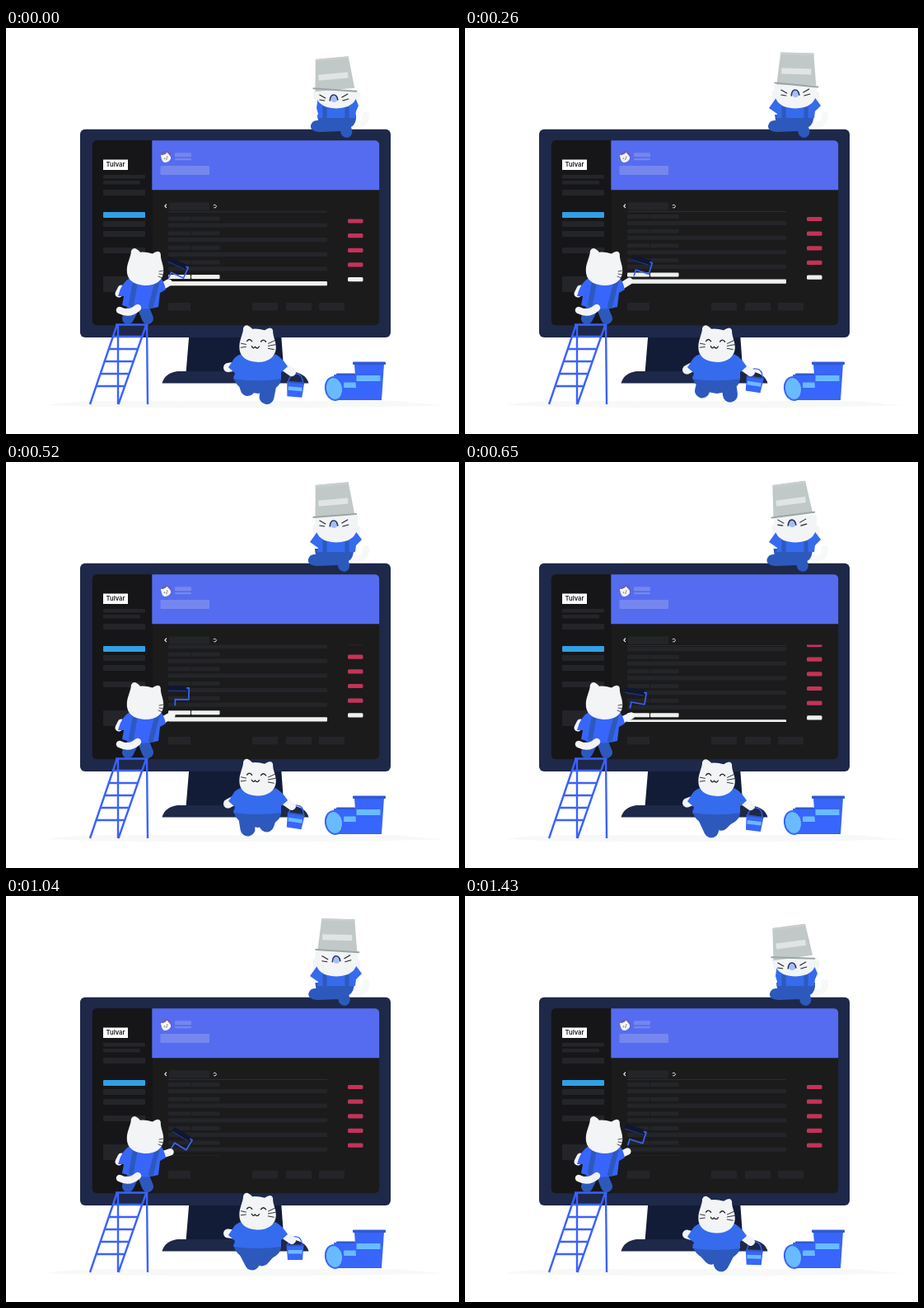
These frames come from a looping animation (550 px wide and 492 px high, 1560 ms). An HTML page:

```html
<!DOCTYPE html>
<html lang="en">
<head>
<meta charset="utf-8">
<title>Painting cats</title>
<style>
html, body { margin: 0; width: 100%; height: 100%; overflow: hidden; background: #fff; }
svg { display: block; width: 100vw; height: 100vh; }
</style>
</head>
<body>
<svg id="stage" viewBox="0 0 550 492">
  <defs><clipPath id="listClip"><rect x="178" y="221.5" width="275" height="93.5"/></clipPath></defs>
  <g id="scene"></g>
  <g id="list" clip-path="url(#listClip)"></g>
  <g id="ladder" fill="none" stroke="#3a62ff" stroke-width="2.4"></g>
  <g id="painter"></g>
  <g id="sitter"></g>
  <g id="walker"></g>
</svg>
<script>
const STEP = 130, STEPS = 12, ROW = 17.65;
const BRIGHT = '#3865fb', BLUE = '#356bed', DARK = '#2d59bd', FUR = '#f2f4f5', SKY = '#69bbff';
const BAR = '#242529', INK = '#24262e';
const $ = id => document.getElementById(id);

// Cosine that peaks at the given step.
const wave = (k, period, peak) => Math.cos(2 * Math.PI * (k - peak) / period);

const rect = (x, y, w, h, fill, r = 1) =>
  `<rect x="${x}" y="${y}" width="${w}" height="${h}" rx="${r}" fill="${fill}"/>`;
const path = (d, fill) => `<path d="${d}" fill="${fill}"/>`;
const line = (d, color, w) =>
  `<path d="${d}" fill="none" stroke="${color}" stroke-width="${w}" stroke-linecap="round" stroke-linejoin="round"/>`;
const group = (x, y, turn, body, size = 1) =>
  `<g transform="translate(${x} ${y}) rotate(${turn}) scale(${size})">${body}</g>`;

const head = path('M-22 5C-22 -4 -18 -10 -18 -18Q-15 -25 -7 -17Q0 -18 8 -16Q16 -22 18 -16' +
  'C18 -9 22.5 -3 22.5 5C22.5 17 12 23 0 23C-13 23 -22 17 -22 5Z', FUR);

function drawScene() {
  const pairs = [196, 234, 246, 266].map(y => rect(118, y, 51, 7, BAR)).join('');
  const buttons = [299, 340, 380].map(x => rect(x, 333, 31, 9.5, BAR)).join('');
  $('scene').innerHTML =
    path('M49 457Q80 452 130 452H478Q505 456 537 457Q400 461 300 460Q150 461 49 457Z', '#f7f8f8') +
    path('M222.5 370H334L337.5 418H218.5Z', '#131c37') +
    path('M189.5 430.5Q193 418 208 416H346Q364 418 367.5 430.5Z', '#1e2848') +
    rect(90, 122.7, 377, 252.3, '#1e2848', 6) +
    rect(104.7, 136.3, 348.5, 224, '#1b1b1c', 6) +
    path('M111 136.3H178V360H111Q105 360 105 354V142Q105 136.3 111 136.3Z', '#161618') +
    path('M177.3 136.3H447Q453.2 136.3 453.2 142V196.2H177.3Z', '#556cf0') +
    rect(118, 159.5, 30, 12.5, '#fff', 0) +
    `<text x="133" y="168.4" text-anchor="middle" font-family="Inter, sans-serif" font-size="7.6" font-weight="600" fill="#151515">Tulvar</text>` +
    rect(118, 178, 51, 4.5, BAR) + rect(118, 185, 45, 4.5, BAR) + pairs +
    rect(118, 301, 34, 19, BAR) +
    rect(118, 223, 51, 7, '#329fe6') +
    `<circle cx="194.5" cy="156" r="6.7" fill="#6e60ad"/>` +
    group(194, 157, -28, head + line('M-9 1h3M6 1h3M-2 8h4', INK, 3), .25) +
    rect(205, 151.3, 20, 5, '#7587ee') + rect(205, 158, 20, 2.2, '#7587ee') +
    rect(187.5, 167, 59.5, 11, '#7587ee') +
    line('M194.6 214L192.8 215.8L194.6 217.6', '#eee', 1.2) +
    rect(198, 211.3, 49, 9.5, BAR) +
    line('M252 214.8A1.9 1.9 0 1 1 252.6 217.8', '#ddd', 1) +
    rect(197, 222, 193, 1, '#2b2c30', 0) +
    rect(197, 333, 27, 9.5, BAR) + buttons + drawCans();

  let rungs = 'M133 359.5H172.5M135 359L102 456M170.5 359L136.5 456M136 359V456M171 359L172 456';
  for (let y = 374; y < 440; y += 15) rungs += `M${135 - (y - 359) * .34} ${y}h35`;
  $('ladder').innerHTML = `<path d="${rungs}"/>`;
}

function drawCans() {
  return path('M398 420L431 419V451H400Z', BRIGHT) +
    rect(401, 418.5, 23, 2.5, '#3059cf') +
    rect(410, 429.5, 16, 6.5, SKY) +
    path('M423 407H459L456 451H426Z', BRIGHT) +
    rect(421, 404.5, 40, 3.5, '#3059cf') +
    rect(425.5, 421, 29, 7, SKY, 0) +
    `<ellipse cx="398.5" cy="437" rx="10.5" ry="14" transform="rotate(-10 398.5 437)" fill="${SKY}" stroke="${BRIGHT}" stroke-width="2"/>`;
}

// The list settles, rolls down by one row, then rests.
function drawList(k) {
  const roll = Math.min(1, Math.max(0, (k - 2) / 6)) ** 1.2;
  const top = 231.5 + 1.25 * Math.max(0, 2 - k) + ROW * roll;
  let rows = '';
  for (let i = -2; i < 5; i++) {
    const y = top + i * ROW, painted = i === 4 && roll < 1;
    const fill = painted ? '#eef0ee' : BAR;
    rows += rect(197, y - 5.5, 27, 5, fill) + rect(225, y - 5.5, 34.5, 5, fill) +
      rect(197, y + 2.4, 193, 5.2, fill) +
      rect(415, y - 2.6, 18.5, 5.2, painted ? fill : '#c43358', 1.5);
  }
  $('list').innerHTML = rows;
}

function drawPainter(k) {
  const slow = wave(k, 12, 9), beat = wave(k, 6, 1);
  const px = 199.5 + 2.2 * wave(k, 12, 5), py = 308.5 + 2 * slow;
  const rx = 209.5 + 3.7 * wave(k, 6, 2), ry = 283 + 4.5 * (beat + slow);
  const roller = rect(-12, -3.5, 24, 7, '#10172f') +
    line('M-11 2.7H11', '#273f91', 1) +
    line('M12 -1H14.5V13H-2V20', BRIGHT, 1.7);
  const vest = 'M152 302Q170 311 187 302Q192 307 194 317L187 321L185 338Q164 344 141 336L143 325L136 325Q140 308 152 302Z';
  $('painter').innerHTML =
    group(rx, ry, 19 + 11 * beat + 8 * slow, roller) +
    line('M153 342L148 352M168 342L172 352', DARK, 14) +
    line('M140 316L137 322', FUR, 9) +
    line(`M188 314L${px} ${py}`, FUR, 8.5) +
    path(vest, BRIGHT) +
    line('M157 307L152 335M184 306L176 337', DARK, 6) +
    line('M138 342Q150 348 160 339', FUR, 8.5) +
    group(169, 289, 3, head) +
    line('M186 295l5 -1M186 298l6 1M185 301l5 2', INK, .8);
}

function drawSitter(k) {
  const lift = Math.sin(Math.PI * k / 11), spread = Math.min(1, 2 * lift);
  const sway = wave(k, 6, 2), tilt = 4.5 * sway - 3;
  const bx = 400.3 + 2 * sway, by = 75 - 11 * lift;
  const pail = path('M-24 0L-20 -39H20L24 0Z', '#c1c8c8') +
    path('M-20 -39H20L20.3 -36.5H-20.3Z', '#c9cfcf') +
    rect(-18.5, -20, 36, 7, '#e0e5e4', 0);
  const face = `<ellipse cx="0.5" cy="1" rx="4" ry="4" fill="#a9bdf3"/>` +
    line('M-4.5 3Q-4 -4 0 -4Q4 -4 5 2', '#26336b', 1.6) +
    line('M-17 -4L-10 0M-17 2L-11 3M17 -5L10 -1M18 1L11 3', INK, 1.1);
  const shirt = `M379 83Q401 106 423 82L${428 + spread * 4} 94L425 101L424 109H378L379 104L${377 - spread * 8} 97Z`;
  $('sitter').innerHTML =
    line('M423 117Q437 119 437 105', '#f7f8f8', 8) +
    line(`M${380 - spread * 3} 91L376 79M${424 + spread * 2} 91L427 81`, FUR, 7) +
    group(-3.5 * lift, 0, 0, path('M378 105H425Q426 116 419 120Q423 130 415 133Q407 133 406 125L381 126Q369 125 370 118Q372 111 379 112Z', DARK)) +
    path(shirt, BLUE) +
    line('M387 96V108M414 96V108', DARK, 5) +
    path(`M375.5 ${by}V78Q377 97 401 97.5Q425 97 427 78V${by}Z`, FUR) +
    group(bx - 1.5, by + 10, 0, face) +
    group(bx, by, tilt, pail) +
    group(bx, by, tilt + 9 * (1 - lift), line('M-26 0H26', '#9ca5a5', 2));
}

function drawWalker(k) {
  const slow = wave(k, 12, 9), swing = wave(k, 12, 0);
  const dip = 4 * Math.max(0, wave(k, 5, 6)) ** 2;
  const stride = 6 + 11 * Math.max(0, wave(k, 12, 2));
  const pail = line('M-9 -9Q-7 -20 0 -19Q7 -20 9 -9', BRIGHT, 1.3) +
    path('M-10.5 -9H10.5L9 9H-9Z', BRIGHT) + rect(-8.5, -3, 17, 4.5, SKY, 0) +
    rect(-10.5, -9.5, 21, 2, DARK, 0);
  const shirt = 'M285 395Q278 397 274 405L270 411L278 418L276 425Q306 429 334 425L334 417L342 410Q335 399 327 395Q306 411 285 395Z';
  const face = line('M-13 -2Q-10 -6 -7 -2M4 -2Q7 -6 10 -2', INK, 1.4) +
    line('M-7 4Q-5 8 -3 4.5Q0 8 2 4', INK, 1.3) +
    line('M-20 1L-14 2M-20 6L-14 5M13 0L21 -4M13 3L22 1M13 6L20 7', INK, .9);
  $('walker').innerHTML =
    line(`M291 429L${305 - stride} ${442 - 5 * swing}`, DARK, 18) +
    line(`M320 429L${305 + stride} ${442 + 5 * swing}`, DARK, 18) +
    path('M276 422H334Q336 439 306 443Q279 440 276 422Z', DARK) +
    line(`M277 ${410 + dip / 2}L269.5 ${411.5 - 3 * slow}`, FUR, 11) +
    group(351, 435 - 3.5 * wave(k, 6, 2.5), 4.5 - 5 * slow, pail) +
    line(`M337 ${410 + dip / 2}L347 ${417 + dip / 2}`, FUR, 10) +
    group(0, dip / 2, 0, path(shirt, BLUE)) +
    group(305.5, 381.5 + dip, 2, head + face);
}

let shown = -1;
function render(now) {
  const k = Math.floor(now / STEP) % STEPS;
  if (k === shown) return;
  shown = k;
  drawList(k);
  drawPainter(k);
  drawSitter(k);
  drawWalker(k);
}

drawScene();
render(0);
const start = performance.now();
function tick() {
  render(performance.now() - start);
  requestAnimationFrame(tick);
}
requestAnimationFrame(tick);
</script>
</body>
</html>
```
